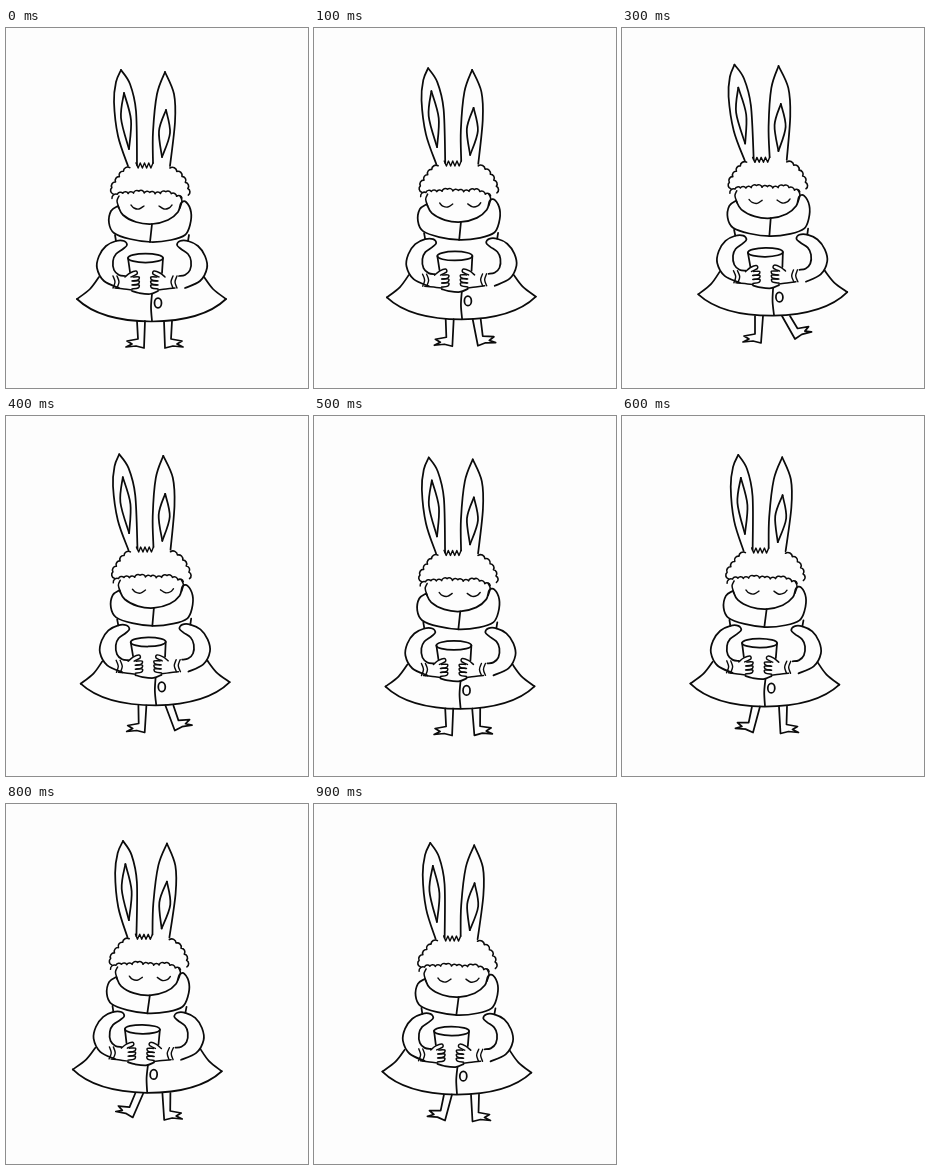
An HTML page for the animation above (1000 ms loop, 302 by 360 pixels).

```html
<!DOCTYPE html>
<html lang="en">
<head>
<meta charset="utf-8">
<title>Walking with a mug</title>
<style>
  html, body { margin: 0; width: 100%; height: 100%; overflow: hidden; background: #fdfdfd; }
  svg { display: block; width: 100vw; height: 100vh; }
  path { fill: none; stroke: #0b0b0b; stroke-width: 1.75; stroke-linecap: round; stroke-linejoin: round; }
</style>
</head>
<body>
<svg viewBox="0 0 302 360"><g id="body"></g><path id="legs"/></svg>
<script>
const body = document.getElementById('body');
const legs = document.getElementById('legs');
const parse = s => s.split(' ').map(p => p.split(',').map(Number));
const line = pts => 'M' + pts.join('L');

// Smooth curve through the points
function curve(p) {
  let d = 'M' + p[0];
  for (let i = 0; i < p.length - 1; i++) {
    const a = p[i - 1] || p[i], b = p[i], c = p[i + 1], e = p[i + 2] || c;
    d += `C${b.map((v, k) => v + (c[k] - a[k]) / 6)} ${c.map((v, k) => v - (e[k] - b[k]) / 6)} ${c}`;
  }
  return d;
}

// Row of small arcs from point to point
function bumps(p) {
  return 'M' + p[0] + p.slice(1).map((q, i) => {
    const r = Math.hypot(q[0] - p[i][0], q[1] - p[i][1]) * 0.58;
    return `A${r} ${r} 0 0 1 ${q}`;
  }).join('');
}

function draw(d, width) {
  const el = document.createElementNS('http://www.w3.org/2000/svg', 'path');
  el.setAttribute('d', d);
  if (width) el.style.strokeWidth = width;
  body.append(el);
}

const stroke = (s, width) => draw(curve(parse(s)), width);

// The same stroke on the left and mirrored about x = axis
function pair(axis, s, width) {
  const p = parse(s);
  draw(curve(p), width);
  draw(curve(p.map(([x, y]) => [2 * axis - x, y])), width);
}

const range = (n, f) => Array.from({ length: n + 1 }, (_, i) => f(i / n, i));
let seed = 7;
const random = () => (seed = seed * 16807 % 2147483647) / 2147483647;

// Ears: two sides meeting in a tip, and the inner slit
stroke('122,138 112,108 108,74 110,54 115,42');
stroke('115,42 124,56 130,83 131,137');
stroke('118,65 115,90 123,121');
stroke('118,65 125,92 123,121');
stroke('147,135 147,104 151,66 159,44');
stroke('159,44 168,66 169,94 164,138');
stroke('160,82 153,103 156,129');
stroke('160,82 164,105 156,129');
draw(line(range(8, (k, i) => [130 + 17 * k, i % 2 ? 140 : 135])), 1.4);

// Hair: curls along an ellipse, then a ragged fringe
const curls = (from, to) => bumps(range(5, k => {
  const a = (from + (to - from) * k) * Math.PI / 180, r = 1 + (random() - 0.5) * 0.06;
  return [144 + 38 * r * Math.cos(a), 166 + 31 * r * Math.sin(a)];
}));
draw(curls(180, 238), 1.6);
draw(curls(302, 362), 1.6);
draw(bumps(range(13, k => [106 + 70 * k, 163 + 5 * (2 * k - 1) ** 4 + 3 * random()])), 1.5);

// Face and collar
pair(143.5, '113,168 111,173 113,180', 1.5);
pair(145.5, '125,177 128,180 133,181 138,178', 1.4);
stroke('112,178 117,187 130,194 146,196 162,192 172,184 175,175 180,174 185,184 184,197 179,207 165,212 145,214 124,211 108,205 103,195 105,183 112,178');
stroke('146,196 145,205 144,214');

// Coat and sleeves
pair(146, '109,207 110,213');
pair(146, '113,260 98,253 91,240 93,228 100,218 110,213 118,213 121,217 117,221 110,226 107,233 108,242 113,247 119,248');
pair(145.5, '93,249 84,261 71,271');
draw('M71 271Q94 293 145.5 293.5Q197 293 220 271');
stroke('146,266 145,279 146,293');
draw('M148.5 275a3.5 4.8 0 1 1 7 0a3.5 4.8 0 1 1 -7 0');

// Mug
draw('M122 230a17.5 4.5 0 1 1 35 0a17.5 4.5 0 1 1 -35 0');
stroke('122,230 124,244');
stroke('157,230 156,245');
stroke('126,263 133,265 144,266 152,263');

// Hands: thumb, knuckles, wrist, cuff
pair(139, '119,249 124,245 130,243 131,246 125,249', 1.5);
for (let y = 249; y < 260; y += 4) pair(139, `127,${y} 133,${y} 132,${y + 3} 126,${y + 4}`, 1.5);
pair(139, '126,262 118,261 109,260', 1.5);
for (const x of [107, 111]) pair(139, `${x},248 ${x + 2},254 ${x},260`, 1.4);

// One leg: side is -1 for left, 1 for right; sway swings the outer leg up
function leg(side, sway) {
  const rise = 5 * Math.abs(sway), push = Math.max(0, side * sway);
  const hip = x => [148.5 + side * x + 2 * sway, 293 - rise];
  const heel = [148.5 + side * (10.5 + 14 * push) + (push ? 0 : sway), 320 - rise - 4 * push * push];
  const c = Math.cos(0.35 * push), s = Math.sin(0.35 * push);
  const foot = parse('0,0 8,-2 18,-1 12,-4 17,-7 6,-9')
    .map(([x, y]) => [heel[0] + side * (x * c + y * s), heel[1] + y * c - x * s]);
  return line([hip(9.5), ...foot, hip(17.5)]);
}

// Lean to the right (1) or left (-1) for each step of 100 ms
const sways = [0, 0.35, 0.7, 1, 0.7, 0.1, -0.5, -1, -0.8, -0.5];
let shown = -1;

function pose(sway) {
  const lean = 0.034 * sway, tilt = -0.015 * sway;
  const dx = 1.5 * sway - lean * 160, dy = -5.8 * Math.abs(sway) - tilt * 145;
  body.setAttribute('transform', `matrix(1 ${tilt} ${lean} 1 ${dx} ${dy})`);
  legs.setAttribute('d', leg(-1, sway) + leg(1, sway));
}

const start = performance.now();
function tick() {
  const n = Math.floor((performance.now() - start) / 100) % sways.length;
  if (n !== shown) pose(sways[shown = n]);
  requestAnimationFrame(tick);
}
tick();
</script>
</body>
</html>
```
